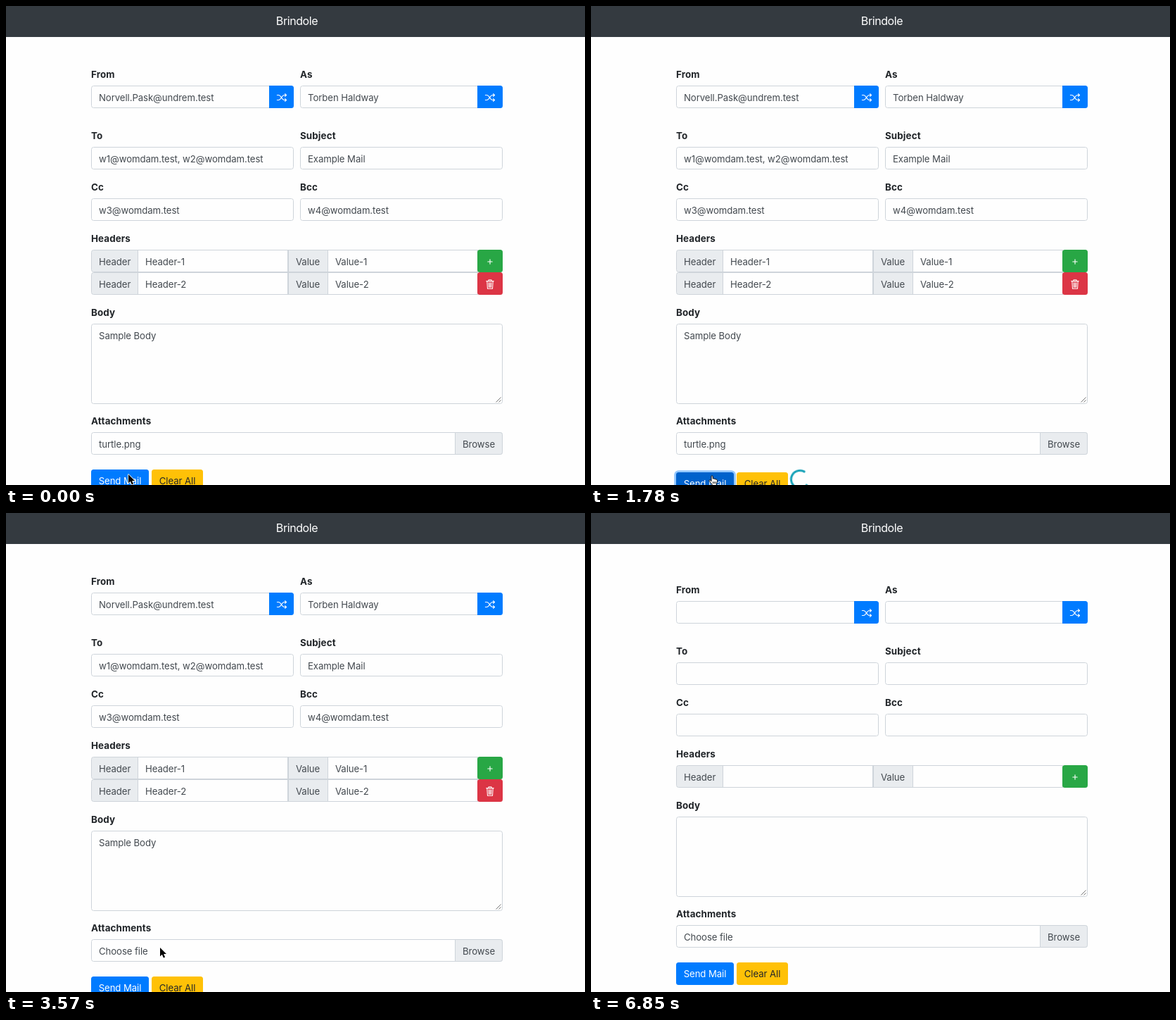
Write an HTML page that moves like this. It is 823x680 px and loops after 7.29 s.

```html
<!DOCTYPE html>
<html lang="en">
<head>
<meta charset="utf-8">
<title>Mail form</title>
<style>
  html, body { margin: 0; width: 100%; height: 100%; overflow: hidden; background: #fefefe; }
  body { font: 13.2px/20px Inter, "Open Sans", sans-serif; letter-spacing: -.08px; color: #43494f; }
  #stage { position: absolute; left: 0; top: 0; width: 823px; height: 680px; overflow: hidden; }
  #stage * { box-sizing: border-box; }
  #page, #form, #lower, #actions { position: absolute; inset: 0; }

  nav { position: absolute; left: 0; top: -20px; width: 827px; height: 64px; padding-top: 30.5px;
        background: #343a40; color: #fff; font-size: 16px; line-height: 21px; letter-spacing: -.4px; text-align: center; }

  label, .box, .btn, .spin { position: absolute; left: var(--x); top: var(--y); }
  label { color: #212529; font-size: 13.4px; font-weight: 700; letter-spacing: .1px; white-space: nowrap; }
  .box { width: var(--w); height: 32px; padding: 5.5px 10px; border: 1px solid #ced4da; border-radius: 3.5px;
         background: #fefefe; white-space: nowrap; }
  .btn { width: var(--w); height: 32px; padding-top: 6px; border-radius: 3.5px; color: #fff; text-align: center; }
  .icon { padding: 0; }
  .icon svg { position: absolute; left: 50%; top: calc(50% + 1.3px); transform: translate(-50%, -50%); }
  .left { border-radius: 3.5px 0 0 3.5px; }
  .right { border-radius: 0 3.5px 3.5px 0; }
  .mid { border-radius: 0; }
  .tag { background: #e9ecef; }
  .blue { background: #007bff; }
  .green { background: #28a745; }
  .red { background: #dc3545; }
  .yellow { background: #ffc107; color: #212529; }
  .line { fill: none; stroke: #fff; stroke-width: 1.1; stroke-linecap: round; stroke-linejoin: round; }
  .grip { position: absolute; right: 1px; bottom: 1px; fill: none; stroke: #777; stroke-width: 1; }
  .spin { width: 28px; height: 28px; border: 3.5px solid #17a2b8; border-right-color: transparent; border-radius: 50%; }

  #cursor { position: absolute; left: 0; top: 0; }
  #cursor svg { position: absolute; overflow: visible; }
  #arrow { left: 0; top: 0; }
  #hand { left: -5px; top: -1px; }

  /* Everything shares one 7290 ms clock and changes in hard steps. */
  #page, #form, #lower, #actions, .full, .file, .nofile, .spin, #send, #clear, #cursor, #arrow, #hand {
    animation: 7290ms step-end infinite;
  }
  #page { animation-name: bounce; }
  #form { animation-name: scroll; }
  #lower { animation-name: collapse; }
  #actions { animation-name: nudge; }
  .full { animation-name: full; }
  .file { animation-name: file; }
  .nofile { animation-name: nofile; }
  .spin { animation-name: spin; }
  #send { animation-name: send; }
  #clear { animation-name: clear; }
  #cursor { animation-name: move; }
  #arrow { animation-name: arrow; }
  #hand { animation-name: hand; }

  @keyframes bounce {
    0%, 10.15%, 46.91%, 100% { transform: none; }
    8.23%, 44.99% { transform: translateY(-1px); }
    40.87% { transform: translateY(-4px); }
    42.93% { transform: translateY(-2px); }
  }
  @keyframes scroll {
    0%, 40.87% { transform: translateY(-12px); }
    26.47%, 69.54%, 100% { transform: none; }
  }
  @keyframes collapse {
    0% { transform: none; }
    69.54%, 100% { transform: translateY(-32px); }
  }
  @keyframes nudge {
    0%, 26.47%, 69.54%, 100% { transform: none; }
    24.41%, 67.48% { transform: translateY(4px); }
  }
  @keyframes full {
    0% { visibility: visible; }
    69.54%, 100% { visibility: hidden; }
  }
  @keyframes file {
    0% { visibility: visible; }
    26.47%, 100% { visibility: hidden; }
  }
  @keyframes nofile {
    0% { visibility: hidden; }
    26.47%, 100% { visibility: visible; }
  }
  @keyframes spin {
    0%, 26.47%, 69.54%, 100% { visibility: hidden; transform: none; }
    24.41% { visibility: visible; transform: rotate(-10deg); }
    67.48% { visibility: visible; transform: rotate(33deg); }
  }
  @keyframes send {
    0%, 26.47%, 100% { background: #007bff; box-shadow: none; }
    20.3% { background: #0069d9; box-shadow: none; }
    24.41% { background: #0062cc; box-shadow: 0 0 0 2.8px rgba(38, 143, 255, .5); }
  }
  @keyframes clear {
    0%, 73.66%, 100% { background: #ffc107; box-shadow: none; }
    53.08%, 69.54% { background: #e0a800; box-shadow: none; }
    65.43%, 67.48% { background: #d39e00; box-shadow: 0 0 0 2.8px rgba(222, 170, 12, .5); }
  }
  @keyframes move {
    0% { transform: translate(174px, 665px); }
    2.05% { transform: translate(175px, 658px); }
    4.11% { transform: translate(175px, 652px); }
    12.2% { transform: translate(175px, 653px); }
    14.26% { transform: translate(174px, 656px); }
    16.32% { transform: translate(174px, 659px); }
    18.24% { transform: translate(173px, 663px); }
    20.3% { transform: translate(172px, 666px); }
    22.35% { transform: translate(172px, 667px); }
    34.7% { transform: translate(208px, 593px); }
    46.91% { transform: translate(211px, 600px); }
    48.97% { transform: translate(219px, 617px); }
    51.02% { transform: translate(229px, 640px); }
    53.08% { transform: translate(237px, 660px); }
    55.14% { transform: translate(242px, 667px); }
    73.66% { transform: translate(262px, 630px); }
    75.72% { transform: translate(312px, 560px); }
    77.77% { transform: translate(356px, 492px); }
    79.69% { transform: translate(369px, 467px); }
    81.75% { transform: translate(371px, 510px); }
    85.87% { transform: translate(480px, 566px); }
    87.79% { transform: translate(695px, 650px); }
    91.9% { transform: translate(803px, 668px); }
    93.96%, 100% { transform: translate(840px, 700px); }
  }
  @keyframes arrow {
    0%, 34.7%, 73.66%, 100% { visibility: visible; }
    20.3%, 53.08% { visibility: hidden; }
  }
  @keyframes hand {
    0%, 34.7%, 73.66%, 100% { visibility: hidden; }
    20.3%, 53.08% { visibility: visible; }
  }
</style>
</head>
<body>
<svg width="0" height="0" style="position:absolute">
  <symbol id="shuffle" viewBox="0 0 15 12">
    <path class="line" d="M.8 2.5H3C6.5 2.5 7.5 9.5 11 9.5H14M.8 9.5H3C6.5 9.5 7.5 2.5 11 2.5H14M12 .6L14 2.5L12 4.4M12 7.6L14 9.5L12 11.4"/>
  </symbol>
</svg>
<div id="stage">
  <div id="page">
    <div id="form">
      <label style="--x:121px;--y:99px">From</label>
      <div class="box left" style="--x:121px;--y:125px;--w:254px"><span class="full">Norvell.Pask@undrem.test</span></div>
      <div class="btn icon right blue" style="--x:374px;--y:125px;--w:35px"><svg width="15" height="12"><use href="#shuffle"/></svg></div>
      <label style="--x:418px;--y:99px">As</label>
      <div class="box left" style="--x:418px;--y:125px;--w:253px"><span class="full">Torben Haldway</span></div>
      <div class="btn icon right blue" style="--x:670px;--y:125px;--w:36px"><svg width="15" height="12"><use href="#shuffle"/></svg></div>

      <label style="--x:121px;--y:185.5px">To</label>
      <div class="box" style="--x:121px;--y:212px;--w:288px"><span class="full">w1@womdam.test, w2@womdam.test</span></div>
      <label style="--x:418px;--y:185.5px">Subject</label>
      <div class="box" style="--x:418px;--y:212px;--w:288px"><span class="full">Example Mail</span></div>

      <label style="--x:121px;--y:258.5px">Cc</label>
      <div class="box" style="--x:121px;--y:285px;--w:288px"><span class="full">w3@womdam.test</span></div>
      <label style="--x:418px;--y:258.5px">Bcc</label>
      <div class="box" style="--x:418px;--y:285px;--w:288px"><span class="full">w4@womdam.test</span></div>

      <label style="--x:121px;--y:331.5px">Headers</label>
      <div class="box left tag" style="--x:121px;--y:358px;--w:67px">Header</div>
      <div class="box mid" style="--x:187px;--y:358px;--w:214px"><span class="full">Header-1</span></div>
      <div class="box mid tag" style="--x:401px;--y:358px;--w:57px">Value</div>
      <div class="box mid" style="--x:457px;--y:358px;--w:214px"><span class="full">Value-1</span></div>
      <div class="btn icon green" style="--x:670px;--y:358px;--w:36px">
        <svg width="8" height="8"><path class="line" d="M4 .8V7.2M.8 4H7.2"/></svg>
      </div>

      <div class="full">
        <div class="box left tag" style="--x:121px;--y:390px;--w:67px">Header</div>
        <div class="box mid" style="--x:187px;--y:390px;--w:214px">Header-2</div>
        <div class="box mid tag" style="--x:401px;--y:390px;--w:57px">Value</div>
        <div class="box mid" style="--x:457px;--y:390px;--w:214px">Value-2</div>
        <div class="btn icon red" style="--x:670px;--y:390px;--w:36px">
          <svg width="12" height="14"><path class="line" d="M.8 2.6H11.2M4 2.4V.8H8V2.4M1.8 2.8L2.5 13.2H9.5L10.2 2.8M4.2 4.8L4.5 11.2M6 4.8V11.2M7.8 4.8L7.5 11.2"/></svg>
        </div>
      </div>

      <div id="lower">
        <label style="--x:121px;--y:436.5px">Body</label>
        <div class="box" style="--x:121px;--y:463px;--w:585px;height:114px">
          <span class="full">Sample Body</span>
          <svg class="grip" width="8" height="8"><path d="M.5 7.5L7.5 .5M4.5 7.5L7.5 4.5"/></svg>
        </div>
        <label style="--x:121px;--y:591px">Attachments</label>
        <div class="box" style="--x:121px;--y:617px;--w:585px">
          <span class="file">turtle.png</span>
          <span class="nofile" style="position:absolute;left:10px">Choose file</span>
        </div>
        <div class="box right tag" style="--x:638px;--y:617px;--w:68px">Browse</div>
        <div id="actions">
          <div id="send" class="btn blue" style="--x:121px;--y:670px;--w:82px">Send Mail</div>
          <div id="clear" class="btn yellow" style="--x:207px;--y:670px;--w:73px">Clear All</div>
        </div>
        <div class="spin" style="--x:283px;--y:669.5px"></div>
      </div>
    </div>
    <nav>Brindole</nav>
  </div>
  <div id="cursor">
    <svg id="arrow" width="10" height="16">
      <path d="M0 0V12.4L2.8 9.8L4.9 14.4L7.1 13.4L5.1 9H9Z" fill="#000" stroke="#fff" stroke-width="1.6" stroke-linejoin="round" paint-order="stroke"/>
    </svg>
    <svg id="hand" width="14" height="16">
      <path d="M4 8.6V1.7C4 .4 6 .4 6.1 1.7L6.4 5.2C7 4.4 8.3 4.6 8.5 5.6C9.2 5 10.3 5.3 10.5 6.3C11.4 5.8 12.5 6.3 12.5 7.4C12.6 10 11.9 11.4 11.2 12.6V14.6H5.2V13.2C3.7 11.7 2.5 9.8 1.1 8.4C.5 7.4 1.7 6.6 2.5 7.2Z" fill="#fff" stroke="#000" stroke-linejoin="round"/>
      <path d="M6.5 9.2V12M8.3 9.2V12M10.1 9.2V12" stroke="#000" stroke-width=".8"/>
    </svg>
  </div>
</div>
</body>
</html>
```
